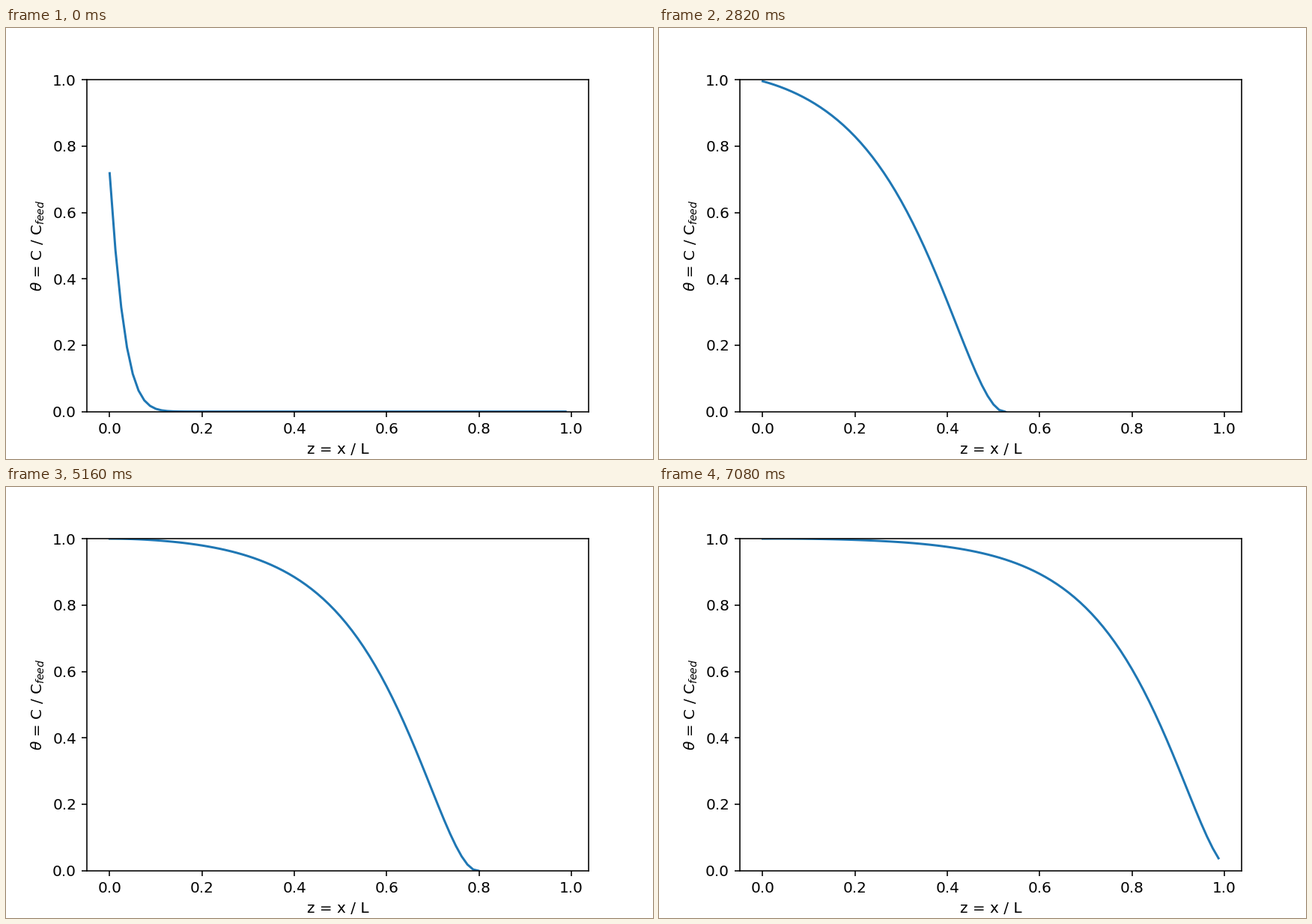
Animation of 864x576 px, one loop 7140 ms. Source, as a matplotlib script:

```python
import numpy as np
import matplotlib.pyplot as plt
from matplotlib.animation import FuncAnimation

FRAMES = 119
INTERVAL = 60
DZ = 1 / 80
z = np.arange(80) * DZ


def growth(x, rate, lag):
    return np.exp(rate * x) - 1 - lag * (1 - np.exp(-x / 0.08))


def travelling_wave(n):
    # The front settles to a constant speed while the profile steepens
    front = 0.211 + 0.00695 * n - 0.039 * np.exp(-n / 16)
    rate = 6.88 * np.tanh((n + 1) / 24)
    lag = 0.017 * max(n - 43, 0)
    w = 1 - growth(z + DZ, rate, lag) / growth(front, rate, lag)
    return np.maximum(w * np.abs(w), -0.05)


def start_profile():
    i = z / DZ
    return np.exp(-0.331 - 0.365 * i - 0.024 * i**2)


def profile(n):
    # The fluid fills the bed within the first few steps
    fade = np.exp(-1.2 * n)
    return fade * start_profile() + (1 - fade) * travelling_wave(n)


fig, ax = plt.subplots(figsize=(6, 4), dpi=144)
line, = ax.plot(z, profile(0))
ax.set_ylim(0, 1)
ax.set_xlabel("z = x / L")
ax.set_ylabel(r"$\theta$ = C / C$_{feed}$")


def update(n):
    line.set_ydata(profile(n))
    return line,


anim = FuncAnimation(fig, update, frames=FRAMES, interval=INTERVAL,
                     repeat=True, repeat_delay=0)
plt.show()
```
